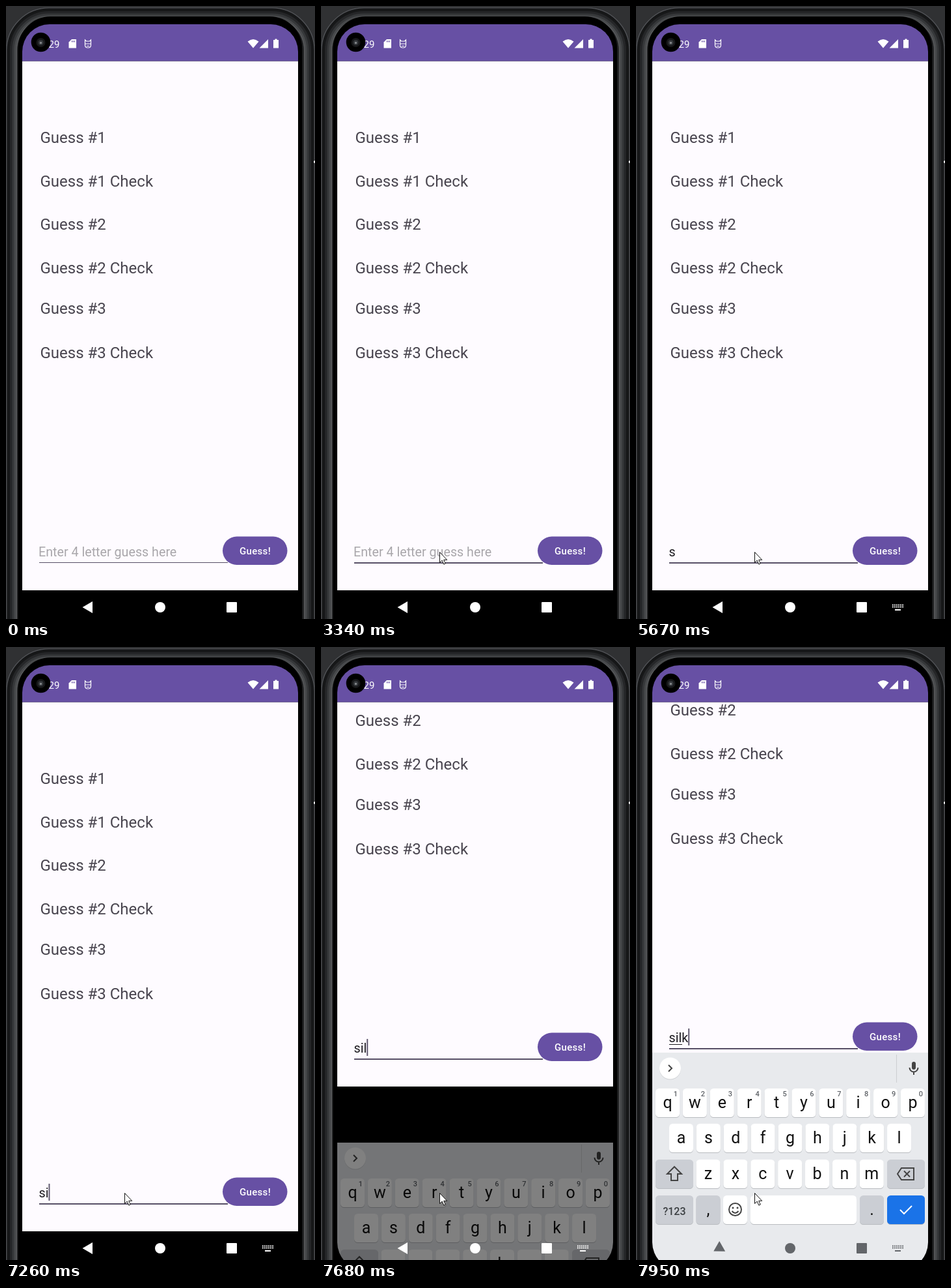
An HTML page for the animation above (8 s loop, 475 by 940 pixels).

```html
<!DOCTYPE html>
<html lang="en">
<head>
<meta charset="utf-8">
<title>Guessing game</title>
<style>
  html, body { margin: 0; width: 100%; height: 100%; overflow: hidden; background: #303133; }
  svg { display: block; width: 475px; height: 940px; font-family: Roboto, sans-serif; }
  .label { font-size: 24px; fill: #49454f; }
  .field { font-size: 19.7px; }
  .key { font-size: 25px; fill: #111; text-anchor: middle; }
  .digit { font-size: 11px; font-weight: 500; fill: #5f6368; text-anchor: middle; }
  .line { fill: none; stroke: #444; stroke-width: 2; }
</style>
</head>
<body>
<svg viewBox="0 0 475 940">
  <defs>
    <clipPath id="screen"><rect x="25" y="28" width="424" height="927" rx="42"/></clipPath>
    <clipPath id="page"><rect x="25" y="84.5" width="424" height="860"/></clipPath>
  </defs>

  <!-- phone body -->
  <rect width="475" height="940" fill="#303133"/>
  <g id="bezel" fill="none"></g>
  <circle cx="475" cy="239" r="2" fill="#fff"/>

  <g clip-path="url(#screen)">
    <rect x="25" y="28" width="424" height="927"/>
    <g clip-path="url(#page)">
      <g id="content">
        <rect x="25" y="84" width="424" height="812" fill="#fefbff"/>
        <g id="labels" class="label"></g>
        <text id="hint" class="field" x="50" y="844" fill="#a9a7ab">Enter 4 letter guess here</text>
        <text id="typed" class="field" x="50.5" y="844" fill="#1d1b20"></text>
        <rect id="composing" x="51" y="847" width="20" height="1" fill="#1d1b20"/>
        <rect id="underline" x="51" y="853" width="290" fill="#574f66"/>
        <rect id="caret" y="823" width="2" height="26" fill="#625b71"/>
        <rect x="333" y="813.5" width="99.5" height="43.5" rx="21.7" fill="#6750a4"/>
        <text x="383" y="841" fill="#fff" font-size="15" font-weight="500" letter-spacing=".3" text-anchor="middle">Guess!</text>
      </g>
    </g>

    <g id="keyboard">
      <rect x="25" y="622" width="424" height="340" fill="#e8eaed"/>
      <circle cx="52.5" cy="647" r="16.5" fill="#cfd1d4"/>
      <circle cx="52.5" cy="646" r="16.5" fill="#fff"/>
      <path class="line" d="M50 641l5 5-5 5"/>
      <path d="M400.5 625v43" stroke="#cdcfd2"/>
      <rect x="424" y="636" width="6" height="12" rx="3" fill="#444"/>
      <path class="line" d="M420.500 645a6.500 6.500 0 0 0 13 0M427 651v5"/>
      <g id="keys"></g>
      <path class="line" d="M59 797l11 11h-6v10h-10v-10h-6z"/>
      <path class="line" d="M408 799h19v18h-19l-6-9zM412 803.500l9 9m0-9l-9 9"/>
      <circle class="line" cx="152.500" cy="862.500" r="9.500"/>
      <path class="line" d="M147.500 865q5 6 10 0"/>
      <circle cx="149" cy="860" r="1.500" fill="#444"/><circle cx="156" cy="860" r="1.500" fill="#444"/>
      <path d="M406 863l6 6 12-12" fill="none" stroke="#fff" stroke-width="2"/>
    </g>

    <!-- status bar -->
    <rect x="25" y="28" width="424" height="56.500" fill="#6750a4"/>
    <g fill="#fff">
      <text x="65.500" y="63.500" font-size="15">29</text>
      <path d="M101 51h7v13.500h-11.500v-9z"/>
      <path d="M371.500 54.500q8.500-7 17 0l-8.500 10zM389.500 64.500l13.500-13.500v13.500zM411 52h2.500v-1.500h3v1.500h2.500v12.500h-8z"/>
      <path d="M121.500 52l2 2h5l2-2v8q0 4-4.500 4t-4.500-4zM121.500 58h9M124 61.500h4" fill="none" stroke="#fff" stroke-width="1.200"/>
    </g>
    <path d="M101.500 53v2.500m2-2.500v2.500m2-2.500v2.500" stroke="#6750a4"/>

    <g id="nav">
      <path id="back" d="M117.500 922l15.500-9v18z"/>
      <circle cx="237" cy="922" r="8"/>
      <rect x="339" y="914" width="16" height="16" rx="1"/>
      <g id="keyboardIcon">
        <path d="M394 918.500h17M394 921.500h17" fill="none" stroke="currentColor" stroke-width="1.800" stroke-dasharray="1.800 1.240"/>
        <path d="M398 925h9v2h-9z"/>
      </g>
    </g>
  </g>

  <!-- camera -->
  <circle cx="53.500" cy="55.500" r="14.800"/>
  <circle cx="53.500" cy="56" r="7" fill="#17181a"/>
  <circle cx="53.500" cy="56" r="4" fill="#33363a"/>
  <circle cx="53.500" cy="56.500" r="1.700" fill="#85898c"/>

  <circle id="touch" cx="182" cy="837" r="13.500" fill="#777" fill-opacity=".25" stroke="#777" stroke-opacity=".4" stroke-width="2"/>
  <path id="pointer" d="M.5.5v16l3.700-3.400 2.600 6 2.500-1.100-2.600-5.700h5z" fill="#fff" stroke="#111"/>
</svg>

<script>
const $ = id => document.getElementById(id);
const clamp = (v, low, high) => Math.max(low, Math.min(high, v));

// Nested outlines: inset, colour, stroke width
$('bezel').innerHTML = [
  [1, '#54565a', 1.5], [4, '#161718', 5], [8, '#252628', 4],
  [11, '#36383a', 3], [14, '#484a4c', 3], [16.500, '#5b5d5f', 2], [18, '#202122', 2]
].map(([d, color, width]) =>
  `<rect x="${d}" y="${d + 2}" width="${475 - 2 * d}" height="1000" rx="${66 - d}" stroke="${color}" stroke-width="${width}"/>`
).join('') + '<rect x="18.500" y="16" width="437" height="980" rx="50" fill="#000"/>';

$('labels').innerHTML = [209.5, 277, 343, 409.5, 471.5, 539.5].map((y, i) =>
  `<text x="52.500" y="${y}">Guess #${(i >> 1) + 1}${i % 2 ? ' Check' : ''}</text>`).join('');

const PITCH = 41.88;
const key = (x, y, width, text = '', fill = '#fff', style = '') =>
  `<rect x="${x}" y="${y + 1}" width="${width}" height="44" rx="5.500" fill="#b9bcc0"/>
   <rect x="${x}" y="${y}" width="${width}" height="44" rx="5.500" fill="${fill}"/>
   <text class="key" x="${x + width / 2}" y="${y + 29.5}" style="${style}">${text}</text>`;
const row = (letters, x, y) => [...letters].map((c, i) => key(x + i * PITCH, y, 37, c)).join('');
const GRAY = '#cbced4';
$('keys').innerHTML =
  row('qwertyuiop', 30, 677) + row('asdfghjkl', 51, 731) + row('zxcvbnm', 92.5, 786) +
  [...'1234567890'].map((c, i) => `<text class="digit" x="${61 + i * PITCH}" y="689">${c}</text>`).join('') +
  key(30, 786, 58, '', GRAY) + key(386, 786, 58, '', GRAY) +
  key(30, 841, 58, '?123', GRAY, 'font-size:16px;font-weight:500;fill:#3c4043') +
  key(92.5, 841, 37, ',', GRAY) + key(134, 841, 37) + key(176, 841, 163) +
  key(344, 841, 37, '.', GRAY) + key(386, 841, 58, '', '#1a73e8');

const caretOn = [[3610, 4080], [4610, 5140], [5210, 5670], [6210, 6660], [7260, 8000]];
const typingTimes = [5210, 6210, 7550, 7940];
const slideSteps = [318, 240, 138, 45, 0];
const fadeSteps = [0, .15, .5, .9, 1];
const step = (t, start) => clamp(Math.floor((t - start) / 70), 0, 3) / 3;

function draw(t) {
  const word = 'silk'.slice(0, typingTimes.filter(at => t >= at).length);
  $('typed').textContent = word;
  $('hint').style.display = word ? 'none' : '';
  $('composing').style.display = word === 'silk' ? '' : 'none';
  $('underline').setAttribute('height', t < 3340 ? 1 : 2);
  $('caret').style.display = caretOn.some(([a, b]) => t >= a && t < b) ? '' : 'none';
  $('caret').setAttribute('x', 50.5 + (word ? $('typed').getComputedTextLength() : 0));

  // Pointer enters, then settles on the field
  const away = (1 - step(t, 640)) ** 2, settle = step(t, 1450);
  const moved = t >= 1450;
  const x = moved ? 179 + 3 * settle : 177.5 + 161 * away;
  const y = moved ? 830 + 7 * settle : 827.5 - 3 * away;
  $('pointer').setAttribute('transform', `translate(${x} ${y})`);
  $('pointer').style.display = t < 640 ? 'none' : '';
  const fade = clamp(1 - (Math.floor((t - 3950) / 65) + 1) / 3, 0, 1);
  $('touch').style.opacity = t >= 1860 && t < 1930 ? 1 : t >= 3810 ? (t < 3950 ? 1 : fade) : 0;

  // Page pans up while the keyboard slides in
  const k = t < 7550 ? 0 : Math.floor((t - 7550) / 66 + .05);
  const shown = Math.min(k, 4);
  $('content').setAttribute('transform', `translate(0 ${-Math.round(238.5 * (1 - .266 ** k))})`);
  $('keyboard').setAttribute('transform', `translate(0 ${slideSteps[shown]})`);
  $('keyboard').style.opacity = fadeSteps[shown];
  const navColor = k > 3 ? '#63666a' : '#fff';
  $('nav').style.fill = $('nav').style.color = navColor;
  $('back').setAttribute('transform', `rotate(${k > 5 ? -30 : k > 4 ? -10 : 0} 127 921)`);
  $('keyboardIcon').style.display = t < 5210 ? 'none' : '';
}

const start = performance.now();
function tick() {
  draw((performance.now() - start) % 8000);
  requestAnimationFrame(tick);
}
tick();
</script>
</body>
</html>
```
